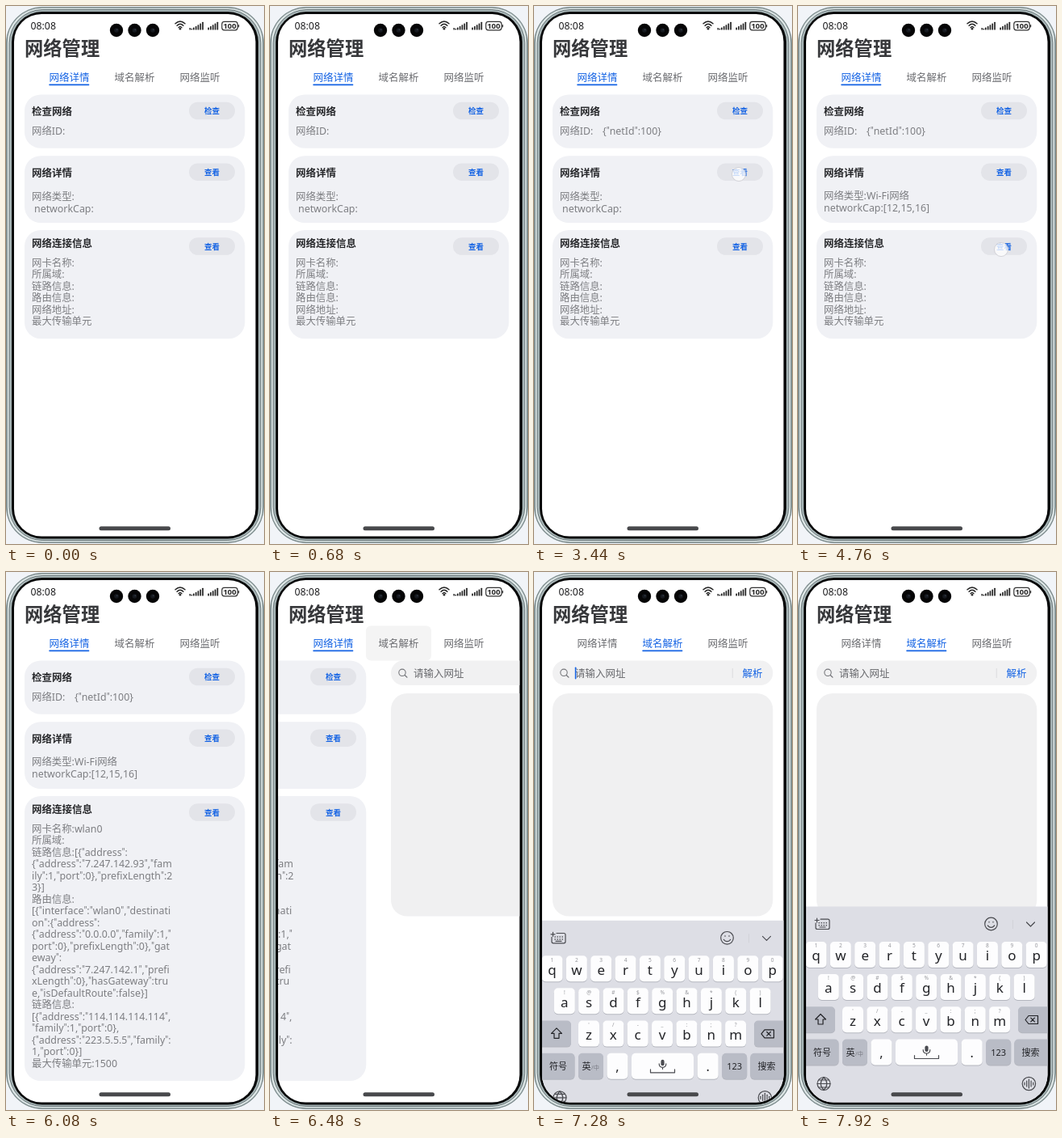
Write an HTML page that moves like this. It is 320 by 665 pixels and loops after 8 s.

```html
<!DOCTYPE html>
<html lang="zh-CN">
<head>
<meta charset="utf-8">
<title>网络管理</title>
<style>
  html, body { margin: 0; width: 100%; height: 100%; overflow: hidden; background: #f1f4f8; }
  svg { display: block; width: 100%; height: 100%; }
  text { font-family: "Noto Sans", "Noto Sans CJK SC", "Noto Sans CJK", sans-serif; }
  .q { font-family: Roboto, sans-serif; }
  .line { fill: none; stroke: #4a4b50; stroke-width: 1.2; stroke-linecap: round; stroke-linejoin: round; }
</style>
</head>
<body>
<svg id="stage" viewBox="0 0 320 665" xmlns="http://www.w3.org/2000/svg"></svg>
<script>
const BLUE = '#1463e4', GREY = '#7d7e82', DARK = '#27282b';

const rect = (x, y, w, h, r, fill, extra = '') =>
  `<rect x="${x}" y="${y}" width="${w}" height="${h}" rx="${r}" fill="${fill}" ${extra}/>`;
const circle = (x, y, r, fill, extra = '') =>
  `<circle cx="${x}" cy="${y}" r="${r}" fill="${fill}" ${extra}/>`;
const line = (d, extra = '') => `<path class="line" d="${d}" ${extra}/>`;
const group = (id, body, extra = '') => `<g id="${id}" ${extra}>${body}</g>`;

// Text placed by the vertical middle of its glyphs.
function label(x, mid, str, { size = 12.4, fill = GREY, weight = 400, anchor = 'start', id = '' } = {}) {
  const body = str.replace(/"/g, '<tspan class="q">"</tspan>');
  return `<text ${id && `id="${id}"`} x="${x}" y="${mid + size * .37}" font-size="${size}" ` +
    `font-weight="${weight}" fill="${fill}" text-anchor="${anchor}">${body}</text>`;
}
const lines = (x, mid, rows) => rows.map((row, i) => label(x, mid + i * 14.5, row)).join('');

function phone() {
  return rect(0, 1, 320, 663, 45, '#8b9a9b') +
    rect(.8, 2, 318.4, 661, 44, 'url(#metal)', 'stroke="#5f6d70" stroke-width=".7"') +
    rect(4.2, 4.6, 311.6, 655.8, 41, '#a9b7b8', 'stroke="#536064" stroke-width=".8"') +
    rect(7, 7, 306, 651.5, 38, '#060708') +
    rect(10, 10, 299.5, 645.5, 34, '#fff');
}

function bars(x, base) {
  return [0, 1, 2, 3, 4].map(i =>
    rect(x + i * 2.8, base - 3 - i * 1.7, 1.7, 3 + i * 1.7, .5, '#222')).join('');
}

function statusBar() {
  const wifi = [[6, 20.8], [3.9, 23.3], [1.9, 25.6]].map(([w, y]) =>
    line(`M${216 - w} ${y + 1} Q216 ${y - w * .75} ${216 + w} ${y + 1}`, 'style="stroke:#222;stroke-width:1.5"')).join('');
  const lenses = [137, 159.5, 182].map(x =>
    circle(x, 30, 8.2, '#050506') + circle(x, 30, 2.8, '#16191f') + circle(x + .7, 29.3, .8, '#39424e')).join('');
  return label(30.5, 24.7, '08:08', { size: 12.3, fill: '#1d1d1f', weight: 500 }) + lenses +
    wifi + circle(216, 28.2, 1.3, '#222') +
    rect(227.5, 27, 1.4, 2.6, .4, '#222') + rect(229.7, 27.8, 1.2, 1.8, .4, '#222') +
    bars(232, 29.6) + bars(250.3, 29.6) +
    rect(267.8, 19.4, 19.4, 10.4, 3, '#fff', 'stroke="#333" stroke-width="1.2"') +
    rect(288, 23, 1.2, 3.4, .6, '#333') +
    label(277.5, 24.6, '100', { size: 9.3, fill: '#222', weight: 700, anchor: 'middle' });
}

function tabs() {
  const names = ['网络详情', '域名解析', '网络监听'];
  return label(23, 52, '网络管理', { size: 23.3, fill: '#37383b', weight: 700 }) +
    rect(119, 66.5, 81, 43, 6, '#f4f4f4', 'id="tabPress"') +
    names.map((name, i) => label(78.5 + i * 81, 88.5, name,
      { size: 12.5, weight: 500, anchor: 'middle', id: 'tab' + i })).join('') +
    rect(53.3, 96.6, 50, 1.6, .6, BLUE, 'id="underline"');
}

function card(y, h, title, titleY, button, buttonY, id) {
  return rect(23, y, 273.3, h, 20, '#f0f1f5', `id="${id}"`) +
    label(32, titleY, title, { size: 12.5, fill: DARK, weight: 700 }) +
    rect(227, buttonY - 10.8, 57, 21.6, 10.8, '#e3e4e9') +
    label(255.5, buttonY, button, { size: 9.5, fill: BLUE, weight: 700, anchor: 'middle' });
}

const CONNECTION = [
  '网卡名称:wlan0', '所属域:', '链路信息:[{"address":',
  '{"address":"7.247.142.93","fam', 'ily":1,"port":0},"prefixLength":2', '3}]',
  '路由信息:', '[{"interface":"wlan0","destinati', 'on":{"address":',
  '{"address":"0.0.0.0","family":1,"', 'port":0},"prefixLength":0},"gat', 'eway":',
  '{"address":"7.247.142.1","prefi', 'xLength":0},"hasGateway":tru', 'e,"isDefaultRoute":false}]',
  '链路信息:', '[{"address":"114.114.114.114",', '"family":1,"port":0},',
  '{"address":"223.5.5.5","family":', '1,"port":0}]', '最大传输单元:1500'
];
const CONNECTION_EMPTY = ['网卡名称:', '所属域:', '链路信息:', '路由信息:', '网络地址:', '最大传输单元'];

function detailsPage() {
  return card(109.5, 66.3, '检查网络', 130.5, '检查', 129.5, 'card0') +
    label(32, 154.5, '网络ID:') + label(85, 154.5, '{"netId":100}', { id: 'netId' }) +
    card(185.2, 82.8, '网络详情', 206.2, '查看', 205.2, 'card1') +
    group('typeEmpty', label(32, 235.5, '网络类型:') + label(35, 250.2, 'networkCap:')) +
    group('typeFull', lines(32, 234.5, ['网络类型:Wi-Fi网络', 'networkCap:[12,15,16]'])) +
    card(277, 134.2, '网络连接信息', 293.5, '查看', 297, 'card2') +
    group('linkEmpty', lines(32, 317, CONNECTION_EMPTY)) +
    group('linkFull', lines(32, 317, CONNECTION));
}

function lookupPage() {
  return rect(23, 109.5, 273.3, 30.6, 15.3, '#f1f1f2') +
    circle(37, 124.3, 4.2, 'none', 'stroke="#77787c" stroke-width="1.1"') +
    line('M40.2 127.5 L43 130.2', 'style="stroke:#77787c"') +
    label(51, 125, '请输入网址', { size: 12.5, fill: '#68696d' }) +
    rect(245.8, 119, .8, 12, 0, '#d6d6d9') +
    label(258.5, 125, '解析', { size: 12.5, fill: BLUE, weight: 500 }) +
    rect(23, 150, 273.3, 275.5, 20, '#f0f0f1') +
    rect(50.8, 117.5, 1.6, 15, .8, BLUE, 'id="caret"');
}

function key(x, y, w, fill) {
  return rect(x, y + 1, w, 32, 5, '#b4b6be') + rect(x, y, w, 32, 5, fill);
}

function letterRow(letters, hints, firstX, y) {
  return [...letters].map((letter, i) => {
    const x = firstX + i * 30.35;
    return key(x - 13, y, 26, '#fdfdfe') +
      label(x, y + 5, hints[i], { size: 6.6, fill: '#96979c', anchor: 'middle' }) +
      label(x, y + 17.2, letter, { size: 17, fill: '#222327', anchor: 'middle' });
  }).join('');
}

function keyboard() {
  const KEY = '#b9bcc6', WHITE = '#fdfdfe';
  const word = (x, str, size = 11) => label(x, 594, str, { size, fill: '#222327', weight: 500, anchor: 'middle' });
  const dots = [0, 1, 2, 3].map(i => rect(25.5 + i * 3, 433, 1.4, 1.4, 0, '#4a4b50') +
    rect(25.5 + i * 3, 436, 1.4, 1.4, 0, '#4a4b50')).join('');
  const wave = [3, 7, 11, 7, 3].map((h, i) =>
    line(`M${281 + i * 2.7} ${632.5 - h / 2} v${h}`)).join('');
  return rect(5, 413.5, 310, 260, 0, '#dddee5') +
    line('M28 429.2 H37 Q39 429.2 39 431.2 V439.5 Q39 441.5 37 441.5 H24 Q22 441.5 22 439.5 V434 M21 430.5 h5 M23.5 428 v5 M27 439 h7') + dots +
    circle(239.5, 435, 7.8, 'none', 'class="line"') +
    line('M235.3 437 Q239.5 441.8 243.7 437 M237 432.4 v.6 M242 432.4 v.6') +
    rect(266, 430, .7, 11, 0, '#cdced5') + line('M283.5 433 L288.5 438 L293.5 433') +
    letterRow('qwertyuiop', '1234567890', 22.5, 457) +
    letterRow('asdfghjkl', '!@#$%\u0026*()', 37.8, 497) +
    letterRow('zxcvbnm', "'/-_:;?", 68, 537.3) +
    key(4, 537.3, 42, KEY) + key(273, 537.3, 42, KEY) +
    line('M28 546.5 L21.5 553 H25 V559 H31 V553 H34.5 Z', 'style="stroke:#222327"') +
    line('M286 548.5 H297.5 V558.5 H286 L282 553.5 Z M288.8 551.2 l4.6 4.6 M293.4 551.2 l-4.6 4.6', 'style="stroke:#222327"') +
    key(4, 577.5, 46.5, KEY) + key(55, 577.5, 31, KEY) + key(90.5, 577.5, 26, WHITE) +
    key(121, 577.5, 77, WHITE) + key(202.7, 577.5, 26, WHITE) + key(233.2, 577.5, 31, KEY) +
    key(268.3, 577.5, 46, KEY) +
    word(30, '符号') + word(65, '英') +
    label(76, 595, '/中', { size: 7.2, fill: '#7a7c84', anchor: 'middle' }) +
    word(103.5, ',', 16) + word(215.7, '.', 16) + word(248.7, '123') + word(288.5, '搜索') +
    rect(157.4, 585.5, 4.2, 7.5, 2.1, '#4a4b50') +
    line('M155.2 590.5 Q155.2 595 159.5 595 Q163.8 595 163.8 590.5 M159.5 595 v2.2 M144.5 597.5 v4 H174.5 v-4') +
    circle(32, 632.5, 8, 'none', 'class="line"') +
    line('M24 632.5 H40 M25.5 628 H38.5 M25.5 637 H38.5 M32 624.5 Q24.5 632.5 32 640.5 Q39.5 632.5 32 624.5') +
    circle(286.4, 632.5, 8.2, 'none', 'class="line"') + wave;
}

document.getElementById('stage').innerHTML = `
  <defs>
    <linearGradient id="metal">
      <stop offset="0" stop-color="#9fb0b1"/><stop offset=".008" stop-color="#dfe8e8"/>
      <stop offset=".5" stop-color="#c3cfcf"/>
      <stop offset=".992" stop-color="#dfe8e8"/><stop offset="1" stop-color="#9fb0b1"/>
    </linearGradient>
    <clipPath id="screen">${rect(10, 10, 299.5, 645.5, 34, '#fff')}</clipPath>
  </defs>` +
  phone() +
  group('content', group('details', detailsPage()) + group('lookup', lookupPage()) +
    tabs() + statusBar() + group('keys', keyboard()) +
    circle(0, 0, 8.5, '#fff', 'id="touch" fill-opacity=".78" stroke="#c9cad0" stroke-width=".8"') +
    rect(115.5, 643.3, 88.5, 5, 2.5, '#48494c'), 'clip-path="url(#screen)"');

const el = id => document.getElementById(id);
const show = (id, on) => el(id).setAttribute('visibility', on ? 'visible' : 'hidden');
const move = (id, x, y) => el(id).setAttribute('transform', `translate(${x} ${y})`);
const held = (steps, t) => steps.reduce((value, [time, next]) => t >= time ? next : value, null);

const LOOP = 8000, PAGE = 304;
const SLIDE = [[0, 0], [6480, 177], [6600, 284], [6720, PAGE]];
const KEYS_DROP = [[0, 260], [7120, 105], [7280, 17.3], [7400, 5], [7520, 1], [7640, 0]];
const TOUCH = [[0, null], [2000, [256, 133]], [2120, null], [3440, [254, 208]], [3560, null],
  [4760, [252, 301]], [4880, null]];

function draw(t) {
  const slide = held(SLIDE, t), touch = held(TOUCH, t);
  const typed = t >= 3560, linked = t >= 4880, active = t >= 6720 ? 1 : 0;

  show('netId', t >= 2120);
  show('typeEmpty', !typed);
  show('typeFull', typed);
  show('linkEmpty', !linked);
  show('linkFull', linked);
  el('card2').setAttribute('height', linked ? 352 : 134.2);

  move('details', -slide, 0);
  move('lookup', PAGE - slide, 0);
  show('tabPress', t >= 6320 && t < 6600);
  for (let i = 0; i < 3; i++) el('tab' + i).setAttribute('fill', i === active ? BLUE : '#6b6c70');
  move('underline', active * 81, 0);

  move('keys', 0, held(KEYS_DROP, t));
  show('caret', t >= 7120 && t < 7800);
  show('touch', touch);
  if (touch) move('touch', ...touch);
}

const start = performance.now();
function tick() {
  draw((performance.now() - start) % LOOP);
  requestAnimationFrame(tick);
}
tick();
</script>
</body>
</html>
```
